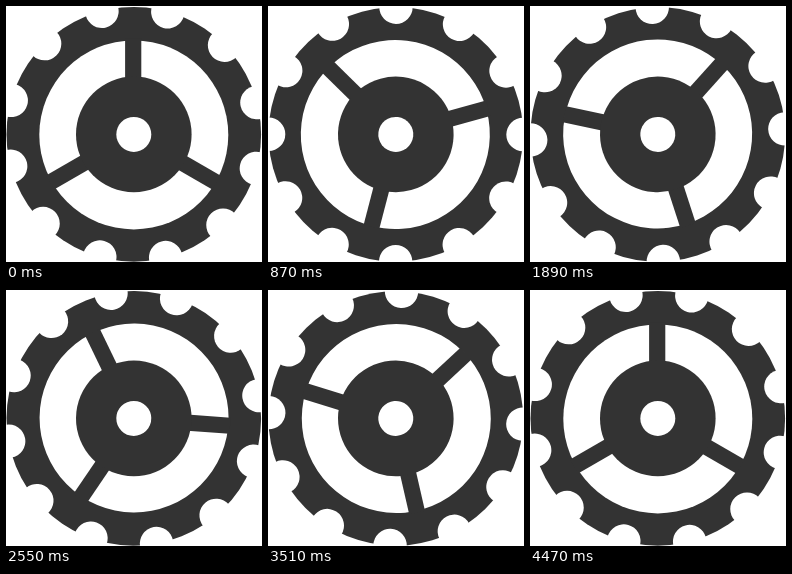
An HTML page that plays this animation: 256 by 256 pixels, repeating every 4500 ms.

```html
<!DOCTYPE html>
<html>
<head>
<meta charset="utf-8">
<style>
html, body { margin: 0; width: 100%; height: 100%; overflow: hidden; background: #fff; }
svg { display: block; width: 100vw; height: 100vh; }
</style>
</head>
<body>
<svg viewBox="0 0 256 256">
  <g id="gear" fill="#333">
    <circle r="127.3"/>
    <g id="notches" fill="#fff"></g>
    <circle cy="0.5" r="94.5" fill="#fff"/>
    <g id="spokes" transform="translate(-0.6)"></g>
    <circle r="57.8"/>
    <circle r="17.5" fill="#fff"/>
  </g>
</svg>
<script>
const LOOP = 4500, STEP = 30, LAST = 149, HALF = 70;
const byId = id => document.getElementById(id);
const ring = (count, offset, shape) => Array.from({ length: count }, (_, i) =>
  `<g transform="rotate(${offset + i * 360 / count})">${shape}</g>`).join('');

byId('notches').innerHTML = ring(12, 15.5, '<circle cy="-127.2" r="16.7"/>');
byId('spokes').innerHTML = ring(3, 0, '<rect x="-8.1" y="-96" width="16.2" height="60"/>');

// One turn: the second half is slightly slower than the first.
const angleAt = step => step < HALF
  ? 180 * step / HALF
  : 180 + 180 * (step - HALF) / (LAST - HALF);

function draw() {
  const step = Math.floor(performance.now() % LOOP / STEP);
  byId('gear').setAttribute('transform', `translate(127.8 128.4) rotate(${angleAt(step)})`);
  requestAnimationFrame(draw);
}
draw();
</script>
</body>
</html>
```
